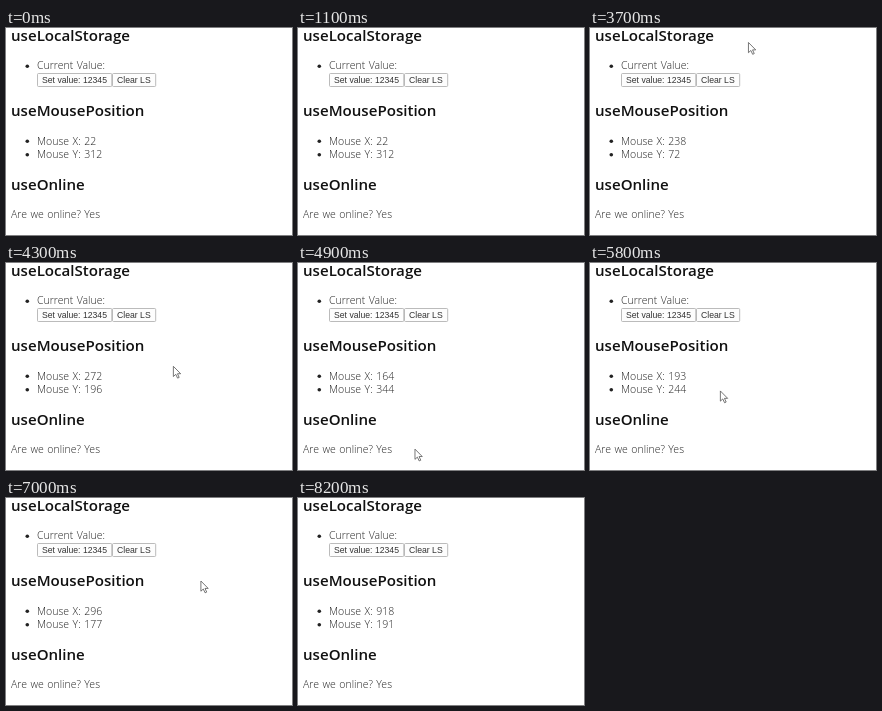
An HTML page for the animation above (8600 ms loop, 286x207 px).

```html
<!DOCTYPE html>
<html lang="en">
<head>
<meta charset="utf-8">
<title>React hooks demo</title>
<style>
  html, body { margin: 0; width: 100%; height: 100%; overflow: hidden; background: #fff; }
  svg { display: block; }
  text { font: 300 10.5px "Open Sans", "Noto Sans", sans-serif; word-spacing: .8px; fill: #222; white-space: pre; }
  .heading { font-size: 15.1px; font-weight: 600; word-spacing: 0; fill: #111; }
  .label { font: 8.67px "Liberation Sans", Arial, sans-serif; word-spacing: 0; fill: #333; }
  .button { fill: #fdfdfd; stroke: #aaa; stroke-width: .8; }
  .bullet { fill: #222; }
</style>
</head>
<body>
<svg width="286" height="207" viewBox="0 0 286 207">
  <text class="heading" x="5" y="13.2">useLocalStorage</text>
  <circle class="bullet" cx="21.3" cy="38.3" r="1.8"/>
  <text x="31" y="41.2">Current Value:</text>
  <rect class="button" x="31.5" y="45.5" width="74.3" height="13" rx="1"/>
  <rect class="button" x="106.5" y="45.5" width="43.2" height="13" rx="1"/>
  <text class="label" x="36" y="55">Set value: 12345</text>
  <text class="label" x="111" y="55">Clear LS</text>

  <text class="heading" x="5" y="88.2">useMousePosition</text>
  <circle class="bullet" cx="21.3" cy="113.3" r="1.8"/>
  <circle class="bullet" cx="21.3" cy="126.8" r="1.8"/>
  <text id="mouseX" x="31" y="116.6"></text>
  <text id="mouseY" x="31" y="130"></text>

  <text class="heading" x="5" y="162.2">useOnline</text>
  <text x="5" y="190.2">Are we online? Yes</text>

  <g id="cursor" fill="#fff" stroke="#555" stroke-width=".8">
    <path id="arrow" d="M0 0V10.2L2.4 8L4.2 11.8L5.8 11.1L4.1 7.4H7.3Z"/>
    <path id="beam" d="M-2-5H2M0-5V5M-2 5H2"/>
  </g>
</svg>
<script>
const LOOP = 8600, STEP = 100, ENTER = 2400, LEAVE = 7400;
const LAG = 50;      // the reading trails the pointer by this much
const SCALE = .645;  // mouse coordinates to stage pixels

// Turning points of the pointer: time, mouse x, mouse y
const path = [
  [2300, 60, 130], [2600, 141, 248], [3300, 290, 140], [3700, 238, 72],
  [4100, 312, 140], [4600, 185, 285], [4900, 164, 344], [5200, 283, 280],
  [5800, 193, 244], [6100, 300, 310], [6400, 414, 289], [6800, 300, 180], [7200, 307, 188]
];

const get = id => document.getElementById(id);

// Catmull-Rom curve through the turning points
function mouseAt(t) {
  const last = path.length - 1;
  if (t >= path[last][0]) return path[last].slice(1);
  const i = Math.max(path.findIndex(p => p[0] > t) - 1, 0);
  const a = path[Math.max(i - 1, 0)], b = path[i], c = path[i + 1], d = path[Math.min(i + 2, last)];
  const span = c[0] - b[0], u = (t - b[0]) / span;
  return [1, 2].map(k => {
    const m0 = (c[k] - a[k]) / (c[0] - a[0]) * span;
    const m1 = (d[k] - b[k]) / (d[0] - b[0]) * span;
    return b[k] + u * (m0 + u * (3 * (c[k] - b[k]) - 2 * m0 - m1 + u * (2 * (b[k] - c[k]) + m0 + m1)));
  });
}

function draw(now) {
  const t = Math.floor(now % LOOP / STEP) * STEP;
  const inside = t >= ENTER && t < LEAVE;
  const [mx, my] = inside ? mouseAt(t) : t < ENTER ? [22, 312] : [918, 191];
  get("mouseX").textContent = "Mouse X: " + Math.round(mx);
  get("mouseY").textContent = "Mouse Y: " + Math.round(my);

  get("cursor").style.display = inside ? "" : "none";
  if (inside) {
    const [px, py] = mouseAt(t + LAG);
    const x = px * SCALE + 2, y = py * SCALE - 33;
    const overText = x < 103;
    get("cursor").setAttribute("transform", `translate(${x} ${y})`);
    get("arrow").style.display = overText ? "none" : "";
    get("beam").style.display = overText ? "" : "none";
  }
  requestAnimationFrame(draw);
}
requestAnimationFrame(draw);
</script>
</body>
</html>
```
